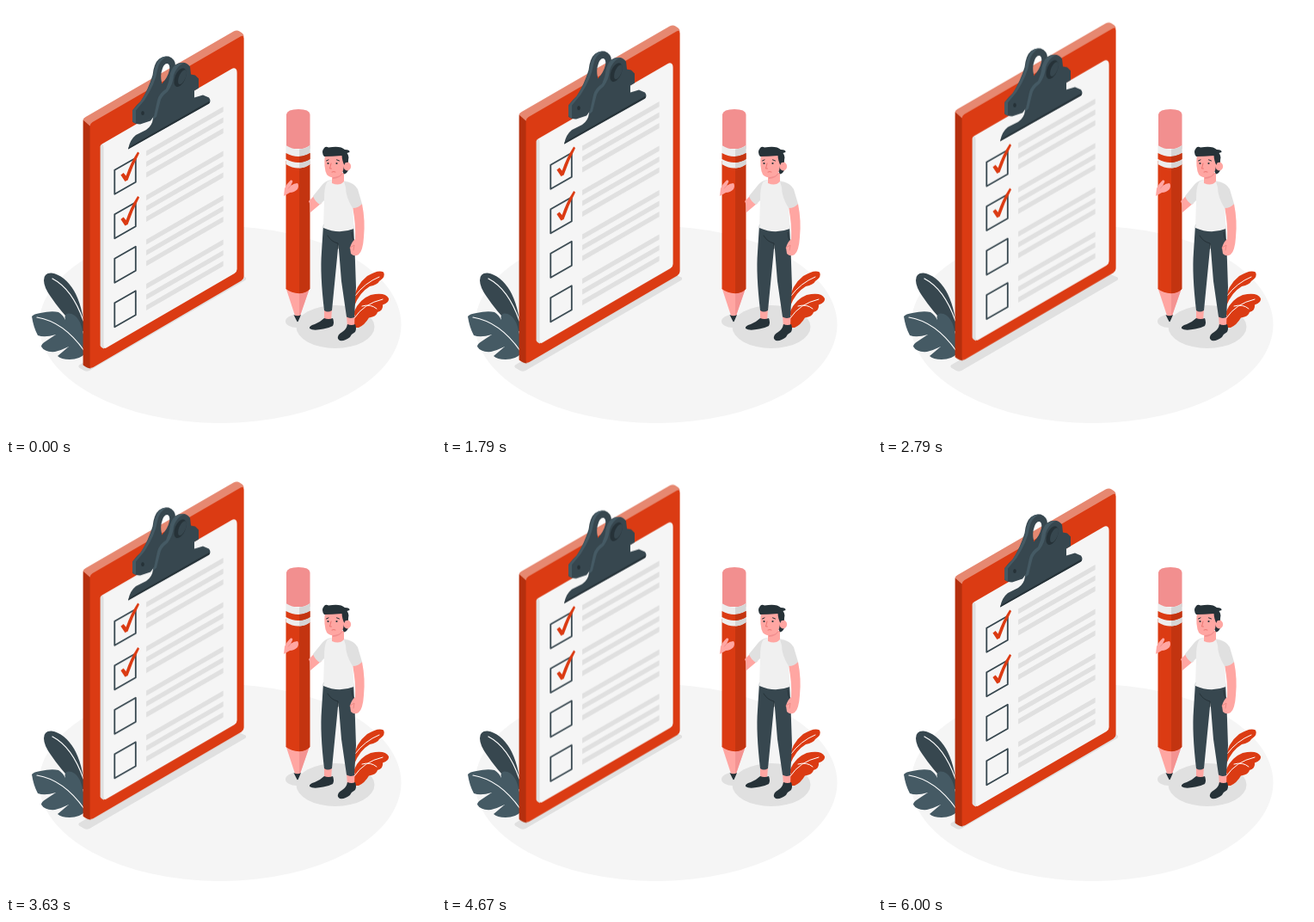
An HTML page for the animation above (6040 ms loop, 500 by 500 pixels).

```html
<!DOCTYPE html>
<html lang="en">
<head>
<meta charset="utf-8">
<title>Checklist</title>
<style>
  html, body { margin: 0; width: 100%; height: 100%; overflow: hidden; background: #fff; }
  svg { display: block; width: 100vw; height: 100vh; }
  .red { fill: #db3b13; }
  .deepRed { fill: #b52f0e; }
  .slate { fill: #37474f; }
  .steel { fill: #455a64; }
  .ink { fill: #263238; }
  .skin { fill: #ffa6a2; }
  .rose { fill: #f28f8f; }
  .pale { fill: #f5f5f5; }
  .grey { fill: #e0e0e0; }
  .line { fill: none; stroke-linecap: round; stroke-linejoin: round; }
</style>
</head>
<body>
<svg viewBox="0 0 500 500">
  <ellipse class="pale" cx="249" cy="370.500" rx="210.500" ry="114.500"/>

  <g id="shadows" class="grey">
    <path d="M85 417.500 L269 311.500 L278.500 315.500 Q280 317.500 278 319 L97 424 Q94 425.500 91 424 L85 420.500 Q83.500 419 85 417.500Z"/>
    <ellipse cx="338" cy="366.500" rx="13" ry="7.500"/>
    <ellipse cx="383" cy="373" rx="45.500" ry="25"/>
  </g>

  <g id="leftPlant">
    <path class="slate" d="M44 319 Q44 310 53 310.500 Q68 313 79 331 Q89 348 92 380 L78 370 Q62 353 52 338 Q44 327 44 319Z"/>
    <path class="steel" d="M30 361 Q32 358 40 357 Q53 354 61 356 Q66 359 69 365 Q67 359 72 357.500 Q80 357 85 366 Q91 376 92 404 Q86 411 74 411 Q64 411 60 407 Q66 402 73 396 Q65 400 57 402 Q45 403 41 396 Q41 393 46 390 L58 382 Q45 386 37 383 Q32 374 30 361Z"/>
    <g class="line" stroke="#fff" stroke-width="1.2">
      <path d="M54 317 Q77 329 90 366"/>
      <path d="M36 362 Q67 367 91 401"/>
    </g>
  </g>

  <g id="board">
    <g transform="translate(-.4 .5)">
      <path class="deepRed" d="M90 132 L99 136 V421 Q95 421 90 417Z"/>
      <path fill="#e68871" d="M90 132 Q90 130 93 128.500 L265 29 Q269 27 272 29 L275 31 Q277 32.500 277 35 L98 139Z"/>
      <path class="red" d="M98 139 Q98 136.500 101 134.500 L273 35 Q277 33 277 37 V314 Q277 317 274 319 L102 419.500 Q98 422 98 417Z"/>
      <path class="grey" d="M110 163 Q110 161 112 160 L117 162 V395 L114 398 Q110 396 110 394Z"/>
      <path class="pale" d="M114 164 Q114 161 112 160 L263 72.500 Q266 71 268 73 Q269 74 269 77 V305.500 Q269 308.500 266 310.500 L117 397 Q114 398.500 114 394Z"/>
      <g id="rows"></g>
    </g>

    <g id="clip" transform="translate(0 .6)">
      <path class="slate" fill-rule="evenodd" d="M147 121 Q152 114 157 110 Q166 95 170.500 80 Q172 66 178 61 Q183 57 189 58 Q197 61 197 69 L193 88 L184 112 L168 133 L156 137 Q150 137 147 134Z M181 88 Q179 80 182 72 Q184 66 188 66.500 Q191 68 190 74 Q188 83 181 90Z"/>
      <path class="steel" d="M147 121 L156 111 Q165 98 171 82 Q173 68 178 62 Q182 58 187 58 Q178 63 176 74 Q174 89 161 109 L151 121 V136 Q147 135 147 132Z"/>
      <ellipse class="ink" cx="159" cy="124" rx="1.800" ry="2.500"/>
      <path class="slate" d="M142 166 Q144 155 151 149.500 L163 143.500 Q170 139 171 130 L175 109 Q178 101 186 96 Q190 87 191 78 Q194 68 201 66 Q209 63 214 70 L215 79 L220 80 L224 84 V95 L219 98 V106 L229 103 L236 106 Q239 110 236 113Z"/>
      <path class="steel" d="M171 132 L176 109 Q178 101 186 96 Q190 87 191 78 Q194 68 201 66 L207 65.500 Q198 70 195 80 Q194 91 188 99 Q180 105 179 112 L175 128Z"/>
      <ellipse class="ink" cx="202.500" cy="82.500" rx="6" ry="11.500" transform="rotate(23 202.500 82.500)"/>
      <ellipse class="slate" cx="205" cy="82" rx="3.800" ry="9" transform="rotate(23 205 82)"/>
      <path class="ink" d="M142 166 L143 163.500 L236 110.500 Q238 111 236 113Z"/>
    </g>
  </g>

  <g id="pencil">
    <path class="skin" d="M325.500 328 L337 363 H341 L353 328Z"/>
    <path class="rose" d="M341 330 V363 L353 328Z" opacity=".85"/>
    <path class="ink" d="M334.500 359 Q339 361.500 343 359 L340 366 Q339 368.500 338 366Z"/>
    <path class="red" d="M325.500 180 H353.300 V329 Q350 333 344 334 Q333 335 325.500 329Z"/>
    <path fill="#c33410" d="M341 184 H353.300 V329 Q349 333.500 341 334Z"/>
    <path class="rose" d="M326 126 Q327 120 340 120 Q353 120 353.500 126 V166 H326Z"/>
    <path fill="#ededed" d="M325.500 162 Q340 171 353.500 162 V184 Q340 193 325.500 184Z"/>
    <path fill="#d5d5d5" d="M341 166.500 Q349 166 353.500 162 V184 Q349 188 341 188.500Z"/>
    <path class="red" d="M325.500 171 Q340 179 353.500 171 V178 Q340 186 325.500 178Z"/>
    <path fill="#c33410" d="M341 175 Q349 174 353.500 171 V178 Q349 181 341 182Z"/>
  </g>

  <g id="rightPlant">
    <path class="red" d="M404 343 Q406 325 420 314 Q433 306 439 309.500 Q442 315 434 320 Q432 324 423 326 Q411 333 405 349Z"/>
    <path class="red" d="M404 374 L405 355 Q411 341 424 336 Q441 332 445 340 Q446 345 438 347.500 Q439 354 432 356 Q431 361 422 362.500 Q417 371 410 374Z"/>
    <g class="line" stroke="#fff" stroke-width="1">
      <path d="M406 337 Q417 322 434 315"/>
      <path d="M405 363 Q416 346 438 341 M414 349 Q424 346 431 352"/>
    </g>
  </g>

  <g id="man">
    <path class="skin" d="M370 352 H379 L378 367 H370Z M396 359 H405.500 L405 375 H397Z"/>
    <path class="ink" d="M353 375 Q352 372 359 370 Q366 367 370 363 Q375 365 380 363 Q382 368 380 372 Q376 374 369 375.500 Q357 378 353 375Z"/>
    <path class="ink" d="M386 387 Q385 382 391 379 Q396 376 397 370 Q402 372 406 370 Q408 375 406 379 Q402 381 400 385 Q394 390 388 389Z"/>
    <path class="slate" d="M369 254 H404 Q406 290 407 327 L405 362 Q400 364 396 361.500 L390 320 L386.500 277 L382.500 318 L379 354 Q374 357 370 354 Q365 312 367 286Z"/>
    <path class="line" stroke="#263238" stroke-width="1" d="M386 282 V276 Q378 274 374 267 M402 263 Q402 270 405 274"/>

    <path class="skin" d="M360 219 L352 227 Q354 230 354 240 L367 229Z"/>
    <path class="grey" d="M378 202 Q371 203 366 210 L357 221 Q359 227 365 231 L373 223Z"/>
    <path class="skin" d="M403 234 L414 230 Q418 250 416 269 Q415 285 410 289 Q405 292 401 288 L400 281 Q402 274 406 271 Q407 254 403 234Z"/>
    <path class="line" stroke="#e8837f" stroke-width=".8" d="M400 281 L405 278 L404 284"/>
    <path fill="#f0f0f0" d="M379 202 Q385 208 393 203 Q402 204 406 211 L403 230 L404.500 259 Q387 266 369 258 L370 226 Q370 208 374 204Z"/>
    <path class="grey" d="M393 204 Q405 205 409 213 L414 230 Q410 235 403 235 Q395 222 395 211Z"/>

    <path class="skin" d="M379 194 H393 V204 Q388 210 379 206Z"/>
    <path class="rose" d="M380 198 L392 194 Q388 201 380 201Z"/>
    <path class="ink" d="M388 174 H398 V191 Q396 195 393 195.500 L390 190Z"/>
    <path class="skin" d="M371 172 H393 V186 Q392 196 386 198 Q377 201 373 196 Q369 188 371 172Z"/>
    <ellipse class="skin" cx="396.800" cy="186.500" rx="4.300" ry="5"/>
    <path class="ink" d="M370 175 Q366 170 370 165 Q372 163 375 164.500 Q389 162 394 167 Q400 167 399.500 170 L396.500 171 Q400 175 397 182 Q394 181 393.500 185 Q391 181 390.500 174 Q379 175 370 175Z"/>
    <g class="ink">
      <circle cx="374.500" cy="183" r="1.100"/>
      <circle cx="384.500" cy="183" r="1.100"/>
    </g>
    <path class="line" stroke="#263238" stroke-width="1" d="M372.500 180 L375 178.800 M384.500 178.800 L387.500 180"/>
    <path class="line" stroke="#e8706d" stroke-width=".9" d="M378 183 L376.500 189 H378.500 M379 193 Q381 192 383 193"/>
    <path class="skin" d="M323 221 L324 212 Q326 207 331 202.500 Q334 202 333 205 L331 209 Q335 206 339 206 Q341 209 339 213 Q335 217 330 217Z"/>
    <path class="line" stroke="#e8837f" stroke-width=".7" d="M331 209 L328.500 212"/>
  </g>
</svg>
<script>
  const NS = "http://www.w3.org/2000/svg";
  const rows = document.getElementById("rows");
  const PITCH = 51.5;

  function add(d, attrs) {
    const path = document.createElementNS(NS, "path");
    path.setAttribute("d", d);
    for (const key in attrs) path.setAttribute(key, attrs[key]);
    rows.append(path);
  }

  for (let row = 0; row < 4; row++) {
    const y = row * PITCH;
    for (let bar = 0; bar < 3; bar++) {
      add(`M163.500 ${168 + y + bar * 12.5} l89.500 -51.500 v6 l-89.500 51.500z`, { class: "grey" });
    }
    add(`M126.700 ${190.2 + y} l24.500 -14 v28 l-24.500 14z`,
      { class: "line", stroke: "#37474f", "stroke-width": 1.8 });
    if (row < 2) {
      add(`M133.800 ${196 + y} l3.200 -2.500 l3 3.500 q5 -15 13.500 -28 l2 1.500 q-8 15 -13.500 31.500 l-3.200 1.500z`, { class: "red" });
    }
  }

  // Linear float: up 10 px in 3 s, back in 3 s, then a short rest.
  const LOOP = 6040;
  document.getElementById("board").animate([
    { transform: "translateY(0)", offset: 0 },
    { transform: "translateY(-10px)", offset: 3000 / LOOP },
    { transform: "translateY(0)", offset: 6000 / LOOP },
    { transform: "translateY(0)", offset: 1 }
  ], { duration: LOOP, iterations: Infinity });
</script>
</body>
</html>
```
